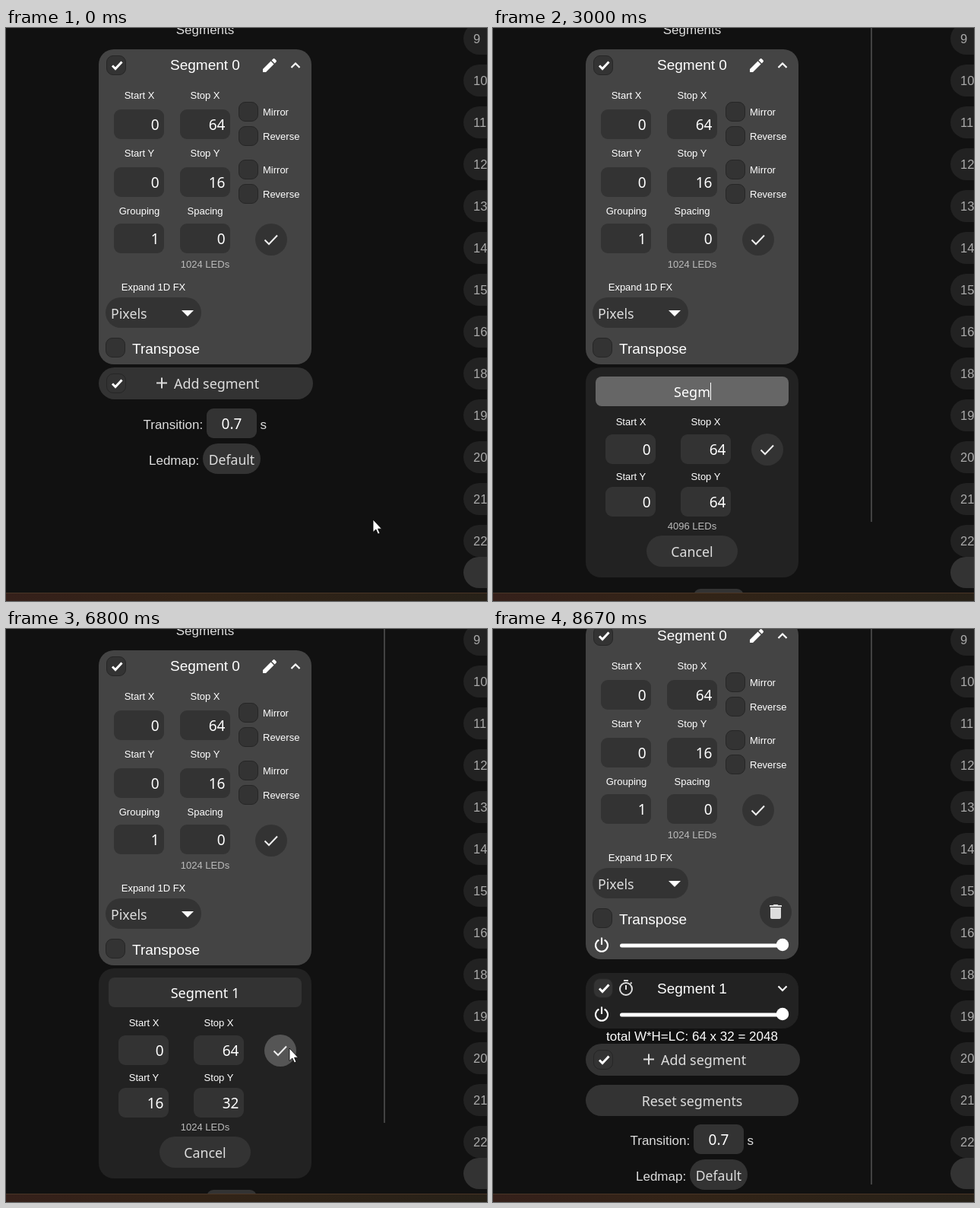
An HTML page that plays this animation: 633 by 753 pixels, repeating every 9470 ms.

```html
<!DOCTYPE html>
<html lang="en">
<head>
<meta charset="utf-8">
<title>Segment editor</title>
<style>
html, body { margin: 0; width: 100%; height: 100%; overflow: hidden; background: #111; }
svg { display: block; width: 633px; height: 753px; }
text { font-family: "Liberation Sans", Arial, sans-serif; fill: #fff; white-space: pre; }
.ui { font-family: "Noto Sans", sans-serif; }
.c { text-anchor: middle; }
.r { text-anchor: end; }
</style>
</head>
<body>
<svg id="stage" viewBox="0 0 633 753" xmlns="http://www.w3.org/2000/svg"></svg>
<script>
const LOOP = 9470, FPS = 15;

// Markup helpers
const attr = id => id ? ` id="${id}"` : '';
const box = (x, y, w, h, r, fill, id) =>
  `<rect${attr(id)} x="${x}" y="${y}" width="${w}" height="${h}" rx="${r}" fill="${fill}"/>`;
const text = (s, x, y, size, cls = '', fill = '#fff', id) =>
  `<text${attr(id)} x="${x}" y="${y}" font-size="${size}" class="${cls}" style="fill:${fill}">${s}</text>`;
const line = (d, w = 2, color = '#fff') =>
  `<path d="${d}" fill="none" stroke="${color}" stroke-width="${w}"/>`;
const group = (id, body, y = 0) => `<g${attr(id)} transform="translate(0 ${y})">${body}</g>`;

const label = (s, x, y) => text(s, x, y, 13, 'c');
const leds = (s, y, id) => text(s, 262, y, 13, 'c', '#bbb', id);
const field = (x, y, value, id) =>
  box(x, y, 66, 39, 9, '#333', id && id + 'Box') + text(value, x + 59.5, y + 27, 19, 'ui r', '#fff', id);
const checkbox = (x, y, on, id) =>
  `<rect${attr(id)} x="${x + .5}" y="${y + .5}" width="25" height="25" rx="8.5" fill="#333" stroke="#262626"/>` +
  (on ? line(`M${x + 8} ${y + 13.5}l4 4 8.5-9`, 3) : '');
const tickButton = (x, y, id) =>
  `<circle${attr(id)} cx="${x}" cy="${y}" r="21" fill="#333"/>` + line(`M${x - 8.5} ${y + .5}l5.5 5.5 11-11.5`, 2, '#eee');
const slider = y =>
  line(`M139.4 ${y - 6.4}a8 8 0 1 0 7.2 0M143 ${y - 9.5}v9.5`, 2.1) +
  box(167, y - 1.5, 214, 5, 2.5, '#fff') + `<circle cx="381" cy="${y}" r="8.2" fill="#fff"/>`;

// Parts of the page, measured from the top of the first card
const preview = () =>
  box(112.5, -218.5, 299, 150, 0, '#0a3f0c') +
  box(112.5, -218.5, 299, 150, 0, 'url(#dots)') +
  `<rect x="112.5" y="-218.5" width="299" height="150" fill="none" stroke="#e8f5e8"/>` +
  box(263, -125, 4, 30, 1, '#e0a030') +
  text('Solid', 122, -78, 19, '', '#f0fff0');

const firstCard = () => {
  let s = box(122, 0, 280, 414, 20, '#444', 'card0') + checkbox(132, 8, true) + text('Segment 0', 262, 27, 19, 'c');
  s += '<path d="M338 30v-4l10.500-10.500 4 4L342 30zM349.600 14.400l2-2q1-.8 2 0l2 2q.8 1 0 2l-2 2z" fill="#fff"/>';
  s += line('M375.500 24l5.500-5.500 5.500 5.500', 2.2);
  const rows = [['Start X', 'Stop X', 0, 64, 79], ['Start Y', 'Stop Y', 0, 16, 155], ['Grouping', 'Spacing', 1, 0, 229]];
  rows.forEach(([a, b, va, vb, y], i) => {
    const base = 65 + i * 76;
    s += label(a, 175.5, base) + label(b, 262, base) + field(142, y, va) + field(229, y, vb);
  });
  for (const y of [69, 145]) {
    s += checkbox(306, y) + text('Mirror', 338, y + 18, 13);
    s += checkbox(306, y + 32) + text('Reverse', 338, y + 50, 13);
  }
  s += tickButton(349, 250) + leds('1024 LEDs', 287) + label('Expand 1D FX', 194, 317);
  s += box(131, 326, 126, 40, 20, '#333') + text('Pixels', 138, 354, 17.8, 'ui', '#ddd') + '<path d="M231 343h16l-8 8z" fill="#fff"/>';
  s += checkbox(131, 379, false, 'transpose') + text('Transpose', 166, 400, 19);
  s += group('extra', '<circle cx="372" cy="384" r="21" fill="#333"/>' +
    '<path d="M365 378h14v13q0 2-2 2h-10q-2 0-2-2zM364 375h4.500l1-1h5l1 1h4.500v2h-16z" fill="#ddd"/>' + slider(427));
  return s;
};

const secondCard = () => group('card1',
  box(122.5, .5, 279, 72, 20, '#222', 'card1Box') + checkbox(132, 7, true) + text('Segment 1', 262, 27, 19, 'c') +
  '<circle cx="175" cy="21" r="8" fill="none" stroke="#ddd" stroke-width="2"/>' +
  line('M172 10h6M175 16v6M181 14l1.500-1.500', 2, '#ddd') +
  line('M375.500 17.500l5.500 5.500 5.500-5.500', 2.2) + slider(54) +
  text('total W*H=LC: 64 x 32 = 2048', 262, 89, 17, 'c'), 464);

const addButton = () => group('add',
  box(122, 0, 282, 42, 21, '#333', 'addBox') + checkbox(132, 8, true) +
  line('M198 20.500h14M205 13.500v14', 2, '#ddd') + text('Add segment', 221, 28, 17.9, 'ui', '#ddd'));

const resetButton = () => group('reset',
  box(122, 0, 280, 41, 20.5, '#333', 'resetBox') + text('Reset segments', 262, 28, 17.8, 'ui c', '#ddd'), 611);

const newPanel = () => group('panel',
  box(122, 0, 280, 276, 20, '#222') + box(135, 12, 254, 39, 8, '#333', 'nameBox') +
  text('', 262, 39, 18, 'ui c', '#fff', 'name') + box(0, 20, 1, 23, 0, '#fff', 'caret') +
  label('Start X', 181.5, 76) + label('Stop X', 280, 76) + field(148, 88, 0) + field(247, 88, 64) +
  label('Start Y', 181.5, 148) + label('Stop Y', 280, 148) +
  field(148, 157, 0, 'startY') + field(247, 157, 64, 'stopY') +
  tickButton(361, 108, 'apply') + leds('', 213, 'count') +
  box(202, 221, 120, 41, 20.5, '#333') + text('Cancel', 262, 249, 17.8, 'ui c', '#ddd'), 418);

const footer = () => group('footer',
  text('Transition:', 180.5, 27, 17, '', '#ddd') + box(264, 0, 66, 39, 9, '#333') +
  text('0.7', 297, 27, 19, 'ui c') + text('s', 334.5, 27, 17, '', '#ddd') +
  text('Ledmap:', 188, 74, 17, '', '#ddd') + box(259, 46, 76, 40, 20, '#333') +
  text('Default', 297, 74, 17.6, 'ui c', '#ddd'));

const sideList = () => {
  const ids = [9, 10, 11, 12, 13, 14, 15, 16, 18, 19, 20, 21, 22];
  return ids.map((n, i) =>
    box(602, i * 55 - 7, 80, 42, 21, '#222') + text(n, 615, i * 55 + 20, 16.5, '', '#aaa')).join('') +
    box(602, 695, 80, 41, 20.5, '#333');
};

const shapes = {
  arrow: '<path d="M0 0V16.500L3.800 13L6.500 19L9 18L6.500 12.200H11.500Z" fill="#fff" stroke="#000" stroke-width=".8"/>',
  hand: '<path d="M-2 1.500a2 2 0 0 1 4 0V8q1.500-1 3 .3 1.500-.8 2.800.6 2.200-.4 2.200 2V15q0 3-2 6.500H-1.500L-6 13.500q-.8-2.200 1.200-2.500L-2 13.500Z" fill="#fff" stroke="#000"/>' +
    '<path d="M1.500 15v4M4 15v4M6.500 15v4" stroke="#000" stroke-width=".8"/>',
  beam: '<path d="M-3-10.500h2.500l.5.500.5-.500h2.500M0-10V11M-3 11.500h2.500l.5-.5.5.500h2.500" fill="none" stroke="#ddd"/>'
};

const stage = document.getElementById('stage');
stage.innerHTML = `<defs>
  <linearGradient id="wood"><stop stop-color="#35201a"/><stop offset=".4" stop-color="#332417"/><stop offset="1" stop-color="#272118"/></linearGradient>
  <pattern id="dots" x="113" y="-218.500" width="4.670" height="4.670" patternUnits="userSpaceOnUse"><circle cx="2.330" cy="2.330" r="1.900" fill="#2db432"/></pattern>
  </defs>` + box(0, 0, 633, 753, 0, '#111') + sideList() + box(497.3, 0, 1.4, 649, 0, '#585858', 'bar') +
  group('page', preview() + text('Segments', 262, -20, 17, 'c', '#ddd') + firstCard() + secondCard() +
    addButton() + resetButton() + newPanel() + footer()) +
  box(0, 742, 633, 11, 0, 'url(#wood)') + box(0, 742, 633, 1, 0, '#4a3626') +
  Object.keys(shapes).map(k => group(k, shapes[k])).join('');

const el = {};
stage.querySelectorAll('[id]').forEach(n => el[n.id] = n);
const show = (id, on) => el[id].setAttribute('display', on ? 'inline' : 'none');
const move = (id, x, y) => el[id].setAttribute('transform', `translate(${x} ${y})`);
const fill = (id, color) => el[id].setAttribute('fill', color);
const put = (id, s) => { if (el[id].textContent !== s) el[id].textContent = s; };
const ease = u => u * u * (3 - 2 * u);

// Pointer path: time, x, y, shape
const pointer = [
  [0, 483, 646, 'arrow'], [70, 483, 646, 'arrow'], [600, 335, 486, 'hand'], [800, 305, 469, 'hand'],
  [930, 306, 468, 'beam'], [1000, 306, 466, 'beam'], [1070, 311, 437, 'hand'], [1130, 314, 426, 'hand'],
  [1200, 314, 426, 'arrow'], [1400, 314, 482, 'beam'], [1600, 314, 482, ''],
  [4070, 312, 508, 'arrow'], [4130, 313, 513, 'arrow'], [4270, 313, 513, 'arrow'],
  [4600, 190, 622, 'beam'], [4930, 190, 622, ''], [5270, 205, 622, 'beam'], [5400, 285, 622, 'beam'],
  [5670, 285, 622, ''], [5930, 292, 612, 'arrow'], [6130, 362, 560, 'hand'], [6330, 373, 551, 'hand'],
  [6730, 373, 551, 'arrow'], [7330, 373, 551, 'arrow'], [7470, 380, 600, 'hand'], [7530, 380, 606, 'hand'],
  [7670, 380, 606, 'hand'], [8200, 382, 500, 'hand'], [8330, 382, 500, 'hand'], [8600, 366, 735, 'arrow'], [8670, 366, 760, '']
];

const typed = [
  [0, ''], [1600, 'S'], [1670, 'Sm'], [2130, 'S'], [2330, ''], [2530, 'S'], [2730, 'Se'], [2870, 'Seg'],
  [3000, 'Segm'], [3130, 'Segme'], [3270, 'Segmen'], [3330, 'Segment'], [3470, 'Segment '], [3530, 'Segment 1']
];
const startY = [[0, 0], [4930, 1], [5070, 16]];
const stopY = [[0, 64], [5670, 3], [5800, 32]];

const lastIndex = (keys, t) => {
  let i = 0;
  while (i + 1 < keys.length && keys[i + 1][0] <= t) i++;
  return i;
};
const valueAt = (keys, t) => keys[lastIndex(keys, t)][1];

function pointerAt(t) {
  const i = lastIndex(pointer, t), a = pointer[i], b = pointer[i + 1] || a;
  const u = b === a ? 0 : ease((t - a[0]) / (b[0] - a[0]));
  return { x: a[1] + (b[1] - a[1]) * u, y: a[2] + (b[2] - a[2]) * u, shape: a[3] };
}

function draw(ms) {
  const t = Math.floor((ms + 4) * FPS / 1000) * 1000 / FPS + 4;
  const within = (a, b) => t >= a && t < b;
  const open = within(930, 6870), done = t >= 6870;
  const scroll = ease(Math.min(1, Math.max(0, (t - 7670) / 470)));
  const top = done ? Math.round(103 - 115 * scroll) : 28;
  const p = pointerAt(t);
  const over = (x, y, w, h) => p.shape && p.x >= x && p.x < x + w && p.y >= y && p.y < y + h;

  move('page', 0, top);
  el.card0.setAttribute('height', done ? 446 : 414);
  for (const id of ['extra', 'card1', 'reset']) show(id, done);
  show('panel', open);
  show('add', !open);
  const addTop = done ? 557 : 418;
  move('add', 0, addTop);
  move('footer', 0, done ? 663 : open ? 709 : 472);
  show('bar', t >= 930);
  el.bar.setAttribute('height', done ? 625 + 105 * scroll : 649);

  fill('addBox', !open && over(122, top + addTop, 282, 42) ? '#555' : '#333');
  fill('resetBox', done && over(122, top + 611, 280, 41) ? '#555' : '#333');
  fill('transpose', over(131, top + 379, 260, 34) ? '#555' : '#333');
  const hot = done && over(122, top + 464, 280, 73);
  fill('card1Box', hot ? '#393939' : '#222');
  el.card1Box.setAttribute('stroke', hot ? '#444' : '#222');

  if (open) {
    const name = valueAt(typed, t), a = valueAt(startY, t), b = valueAt(stopY, t);
    const nameFocus = within(1470, 4670);
    put('name', name || 'New segment 1');
    el.name.style.fill = name ? '#fff' : '#999';
    fill('nameBox', nameFocus ? '#666' : '#333');
    show('caret', nameFocus && t < 4070);
    el.caret.setAttribute('x', name ? Math.round(262 + el.name.getComputedTextLength() / 2) : 262);
    put('startY', String(a));
    put('stopY', String(b));
    fill('startYBox', within(4670, 5530) ? '#666' : '#333');
    fill('stopYBox', within(5530, 6730) ? '#666' : '#333');
    put('count', 64 * Math.max(0, b - a) + ' LEDs');
    fill('apply', Math.hypot(p.x - 361, p.y - 554) < 21 ? '#555' : '#333');
  }

  for (const k in shapes) show(k, k === p.shape && p.y < 742);
  if (p.shape) move(p.shape, Math.round(p.x), Math.round(p.y));
}

const begin = performance.now();
function tick() {
  draw((performance.now() - begin) % LOOP);
  requestAnimationFrame(tick);
}
draw(0);
requestAnimationFrame(tick);
</script>
</body>
</html>
```
